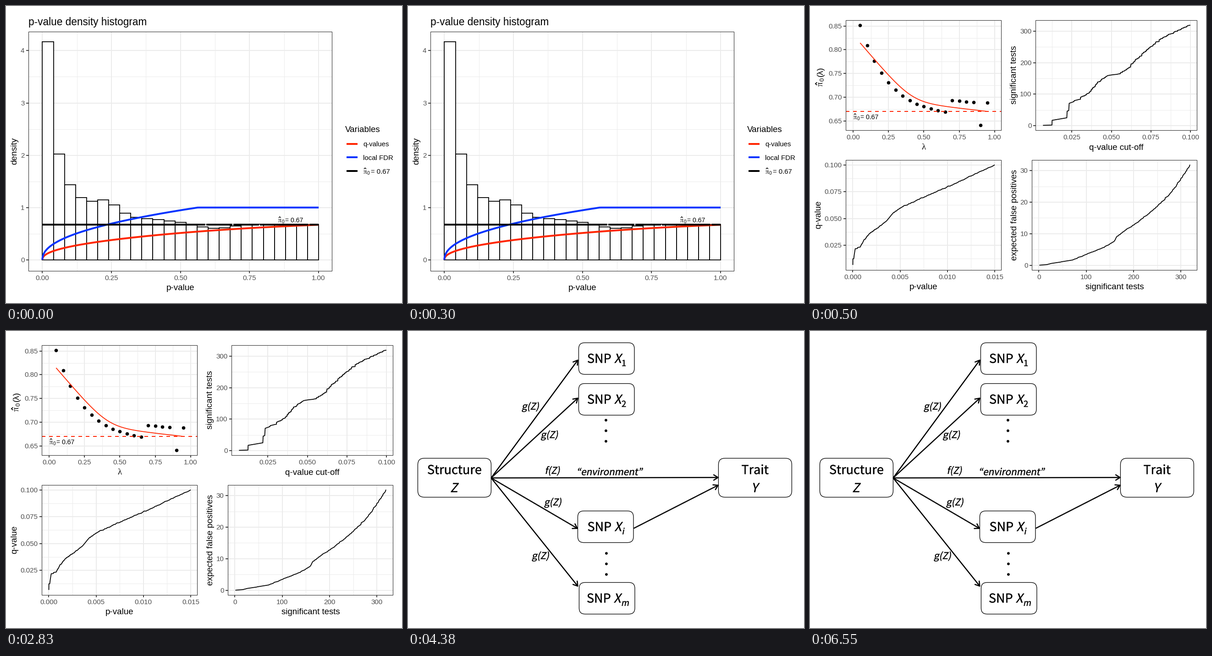
A matplotlib script that plays this animation: 864x648 px, repeating every 8000 ms.

```python
import numpy as np
import matplotlib.pyplot as plt
from matplotlib.animation import FuncAnimation
from matplotlib.patches import Circle, FancyBboxPatch, PathPatch, Rectangle
from matplotlib.textpath import TextPath
from matplotlib.transforms import Affine2D

plt.rcParams["font.family"] = "Liberation Sans"
plt.rcParams["lines.solid_capstyle"] = "butt"

W, H = 864, 648
STEP, LOOP = 20, 8000
STARTS = (0, 500, 4380)
RED, BLUE = "#ff2600", "#0433ff"
GRID, DARK, LABEL = "#ebebeb", "#333333", "#4d4d4d"
TITLE, BASE, SMALL = 22.65, 18.7, 15
PI0 = 0.67

fig = plt.figure(figsize=(W / 72, H / 72), dpi=72, facecolor="white")


def slide():
    # Offsets make whole numbers snap to the pixel of that index.
    ax = fig.add_axes([0, 0, 1, 1])
    ax.set(xlim=(-0.4, W - 0.4), ylim=(H - 0.6, -0.6))
    ax.axis("off")
    return ax


def write(ax, x, y, s, size=SMALL, color="black", ha="left", rot=0, **kw):
    ax.text(x, y, s, size=size, color=color, ha=ha, va="baseline",
            rotation=rot, rotation_mode="anchor", zorder=8, **kw)


def line(ax, x, y, color="black", lw=1.8, z=4, **kw):
    ax.plot(x, y, color=color, lw=lw, zorder=z, **kw)


def pi_hat(ax, x, y, size, tail, rot=0):
    """Estimate symbol with hat and subscript, followed by plain text."""
    def at(along, up):
        along, up = along * size, up * size
        return (x - up, y - along) if rot else (x + along, y - up)
    write(ax, *at(0, 0), "π", size, rot=rot, family="Liberation Serif")
    write(ax, *at(0.56, -0.16), "0", size * 0.7, rot=rot)
    write(ax, *at(1.12, 0), tail, size * 0.98, rot=rot)
    hat = [at(0.11, 0.64), at(0.27, 0.84), at(0.43, 0.64)]
    line(ax, *zip(*hat), lw=size * 0.09, z=8)


def panel(ax, box, xticks, yticks, xtitle="", ytitle="", xbase=0, gap=42):
    """Grid, frame and labels; ticks are (first pixel, pixel step, labels)."""
    l, t, r, b = box
    for lo, hi, (p0, dp, labels), vertical in ((l, r, xticks, True),
                                               (t, b, yticks, False)):
        n = len(labels)
        minor = [p0 + dp * (k + 0.5) for k in range(-1, n)]
        major = [p0 + dp * k for k in range(n)]
        minor = [p for p in minor if lo < p < hi]
        draw = ax.vlines if vertical else ax.hlines
        ends = (t, b) if vertical else (l, r)
        draw(minor, *ends, color=GRID, lw=1, zorder=0)
        draw(major, *ends, color=GRID, lw=2, zorder=1)
        ticks = (b, b + 5) if vertical else (l - 5, l)
        draw(major, *ticks, color=DARK, lw=1.8, zorder=6)
        for p, s in zip(major, labels):
            if vertical:
                write(ax, p, b + 20, s, color=LABEL, ha="center")
            else:
                write(ax, l - 9, p + 5, s, color=LABEL, ha="right")
    ax.add_patch(Rectangle((l, t), r - l, b - t, fill=False, ec=DARK,
                           lw=1.1, zorder=6))
    write(ax, (l + r) / 2, b + gap, xtitle, BASE, ha="center")
    write(ax, xbase, (t + b) / 2, ytitle, BASE, ha="center", rot=90)


def labels(start, step, count, digits):
    return [f"{start + step * k:.{digits}f}" for k in range(count)]


def histogram():
    ax = slide()
    x0, y0, xs, ys = 79, 553.2, 602.7, 114.1
    panel(ax, (49, 55, 711, 577), (x0, xs / 4, labels(0, 0.25, 5, 2)),
          (y0, -ys, labels(0, 1, 5, 0)), "p-value", "density", 23)
    write(ax, 48.5, 41, "p-value density histogram", TITLE)

    k = np.arange(1, 26)
    density = (0.63 + 3.54 * k ** -1.35
               + 0.21 * np.exp(-((k - 6.3) / 1.4) ** 2)
               - 0.11 * np.exp(-((k - 16) / 2.5) ** 2))
    bw = xs / len(k)
    for i, d in enumerate(density):
        ax.add_patch(Rectangle((x0 + i * bw, y0), bw, -d * ys, fc="white",
                               ec="black", lw=1.8, zorder=3))

    p = np.linspace(0, 1, 400) ** 2
    qval = PI0 * p ** 0.43 * (1 + 0.13 * p * (1 - p))
    fdr = np.minimum(1, (p / 0.5625) ** 0.452)
    line(ax, x0 + xs * p, y0 - ys * qval, RED, 4, 4)
    line(ax, x0 + xs * p, y0 - ys * fdr, BLUE, 4, 4.1)
    cuts = [79, 437, 496, 554, 662, 684]
    for a, b in zip(cuts, cuts[1:]):
        line(ax, [a, b - 2], [y0 - ys * PI0] * 2, lw=4, z=5)
    pi_hat(ax, 593, 471, 14.3, f"= {PI0}")

    write(ax, 740, 274, "Variables", BASE)
    for y, color in ((300, RED), (329.5, BLUE), (359, "black")):
        line(ax, [743, 767], [y, y], color, 4)
    write(ax, 778.5, 305, "q-values")
    write(ax, 778.5, 335, "local FDR")
    pi_hat(ax, 779, 365, SMALL, f"= {PI0}")
    return ax


def ranked_tests():
    """q-values in rank order: key points joined with small random steps."""
    keys = np.array([(67, 1), (124, 2), (125, 17), (218, 25), (220, 46),
                     (230, 48), (233, 71), (288, 81), (363, 105), (398, 129),
                     (447, 148), (482, 159), (549, 164), (616, 184),
                     (642, 202), (740, 246), (816, 276), (880, 292),
                     (1000, 319)])
    n = np.arange(1, 320)
    q = np.interp(n, keys[:, 1], keys[:, 0] / 1e4)
    noise = np.random.default_rng(4).normal(-0.0005, 0.0005, len(n))
    q = np.maximum.accumulate(q + noise * (n > 75))
    return n, np.append(q[:-1], 0.1)


def four_plots():
    ax = slide()
    panel(ax, (78, 30, 417, 270), (93.5, 77.25, labels(0, 0.25, 5, 2)),
          (43, 51.8, labels(0.85, -0.05, 5, 2)))
    write(ax, 247.5, 312, "λ", BASE, ha="center", family="Liberation Serif")
    pi_hat(ax, 27, 174, BASE, "(λ)", rot=90)
    panel(ax, (492, 30, 844, 270), (571, 86.17, labels(0.025, 0.025, 4, 3)),
          (260.5, -68.73, labels(0, 100, 4, 0)),
          "q-value cut-off", "significant tests", 449.5, 43)
    panel(ax, (78, 335, 417, 575), (93, 103.2, labels(0, 0.005, 4, 3)),
          (346, 58.5, labels(0.1, -0.025, 4, 3)), "p-value", "q-value", 23)
    panel(ax, (484, 335, 844, 575), (499, 103.3, labels(0, 100, 4, 0)),
          (565, -68.8, labels(0, 10, 4, 0)),
          "significant tests", "expected false positives", 450.5)

    lam = np.arange(1, 20) / 20
    est = 0.66 + 0.192 * np.exp((0.05 - lam) / 0.2) + 0.026 * (lam > 0.68)
    est[-2] -= 0.048
    fine = np.linspace(0.05, 0.95, 60)
    bend = 0.07 * np.logaddexp(0, (0.413 - fine) / 0.07)
    spline = PI0 + 0.0338 * (0.95 - fine) + 0.3137 * bend

    def to_px(x, y):
        return 93.5 + 309 * x, 43 + 1036 * (0.85 - y)

    ax.plot(*to_px(lam, est), "o", ms=7.6, mew=0, color="black", zorder=4)
    line(ax, *to_px(fine, spline), RED)
    line(ax, [78, 417], [229.5, 229.5], RED, 2, dashes=(4, 4))
    pi_hat(ax, 94, 246, 14.3, f"= {PI0}")

    n, q = ranked_tests()
    false_pos = n * q
    p = 0.015 * false_pos / false_pos[-1]
    line(ax, 484.8 + 3446.7 * q, 260.5 - 0.6873 * n)
    line(ax, 93 + 20640 * p, 580 - 2340 * q)
    line(ax, 499 + 1.033 * n, 565 - 6.88 * false_pos)
    return ax


def diagram():
    ax = slide()

    def note(x, y, s, size=27, slant=0, center=False):
        path = TextPath((0, 0), s, size=size,
                        prop=dict(family="Noto Sans CJK JP"))
        if center:
            box = path.get_extents()
            x -= (box.x0 + box.x1) / 2
        place = Affine2D().skew_deg(slant, 0).scale(1, -1).translate(x, y)
        ax.add_patch(PathPatch(path.transformed(place), fc="black",
                               ec="black", lw=0.45))

    def box(l, t, w, h, r=13):
        ax.add_patch(FancyBboxPatch(
            (l, t), w, h, fc="white", ec="black", lw=1.3,
            boxstyle=f"round,pad=0,rounding_size={r}"))

    def arrow(x0, y0, x1, y1):
        line(ax, [x0, x1], [y0, y1], lw=2.5)
        a = np.arctan2(y1 - y0, x1 - x0) + np.array([0.56, -0.56])
        wx, wy = x1 - 11 * np.cos(a), y1 - 11 * np.sin(a)
        line(ax, [wx[0], x1, wx[1]], [wy[0], y1, wy[1]], lw=2.5,
             solid_capstyle="round")

    for l, t, x, sub, slant in ((372, 25, 390.5, "1", 0),
                                (372, 114, 390.5, "2", 0),
                                (370, 392, 391, "i", 11),
                                (373, 548, 389.5, "m", 11)):
        box(l, t, 121.5, 69)
        note(x, t + 44, "SNP")
        note(x + 59, t + 44, "X", slant=11)
        note(x + 75, t + 51, sub, 18.4, slant)
    for l, name, var in ((21, "Structure", "Z"), (677, "Trait", "Y")):
        box(l, 277, 160, 85, 14)
        note(l + 80, 311.5, name, center=True)
        note(l + 79, 351, var, slant=11, center=True)

    for x1, y1 in ((370, 63), (370, 146), (676, 319), (369, 430), (370, 556)):
        arrow(181, 320, x1, y1)
    arrow(492, 430, 676, 336)

    for x, y, s in ((247.5, 171, "g(Z)"), (289, 233, "g(Z)"),
                    (296.5, 380, "g(Z)"), (269.5, 497, "g(Z)"),
                    (298, 311, "f(Z)"), (367, 314, "“environment”")):
        note(x, y, s, 20.6, 11)
    for x, top in ((431.5, 194), (432.5, 484.5)):
        for k in range(3):
            ax.add_patch(Circle((x, top + 23 * k), 2.9, fc="black", lw=0))
    return ax


slides = [histogram(), four_plots(), diagram()]


def show(i):
    current = sum(i * STEP >= s for s in STARTS) - 1
    for k, ax in enumerate(slides):
        ax.set_visible(k == current)
    return slides


anim = FuncAnimation(fig, show, frames=LOOP // STEP, interval=STEP,
                     init_func=lambda: show(0), repeat=True, repeat_delay=0)
plt.show()
```
